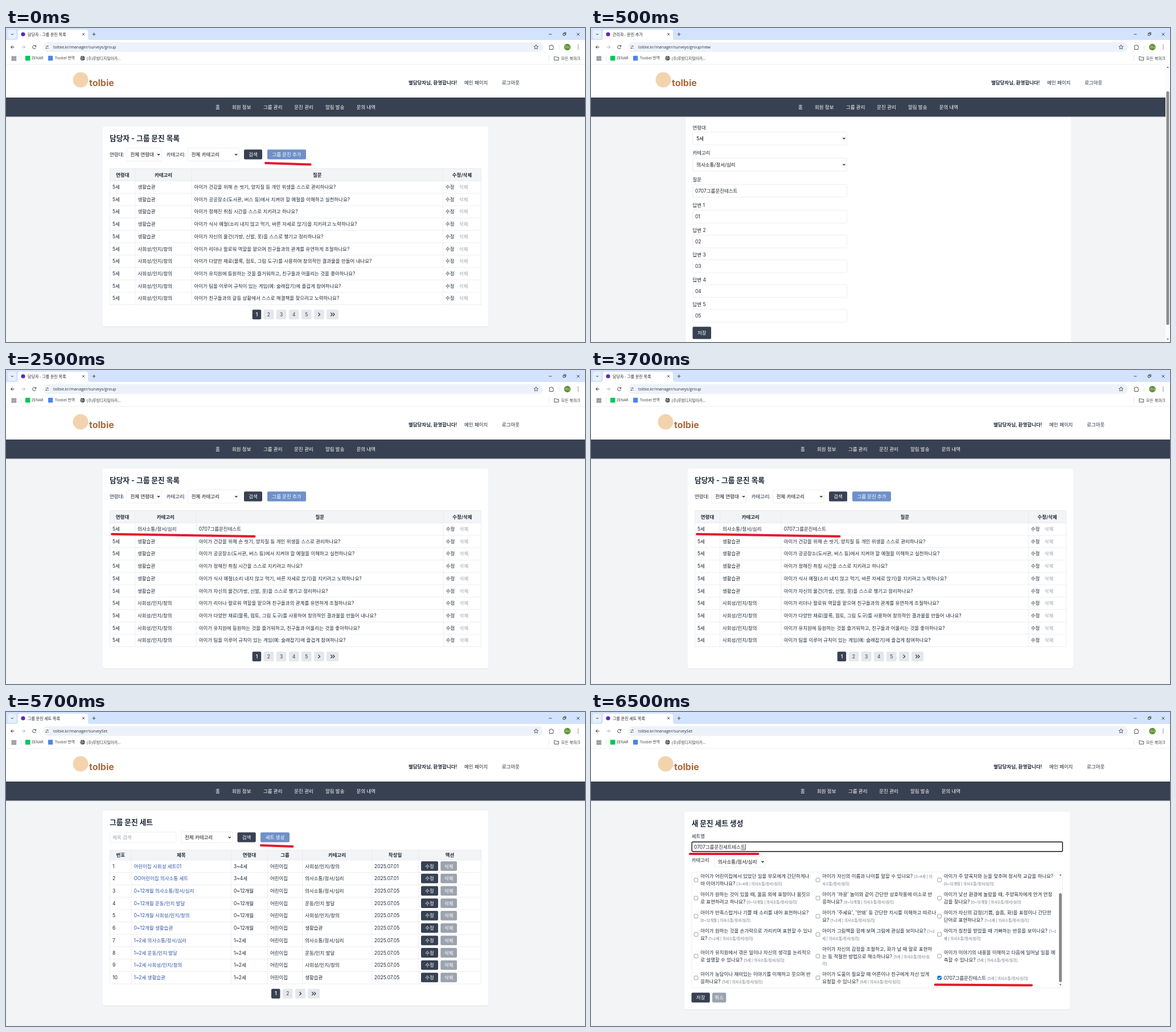
These frames come from a looping animation (1017x551 px, 8 s). An HTML page:

```html
<!DOCTYPE html>
<html lang="ko">
<head>
<meta charset="utf-8">
<style>
html, body { margin: 0; width: 100%; height: 100%; overflow: hidden; background: #f3f4f6; }
svg { display: block; width: 1017px; height: 551px; }
text { font-family: Inter, "Noto Sans CJK KR", "Noto Sans CJK", sans-serif; white-space: pre; }
.ui text { font-family: "Open Sans", "Noto Sans CJK KR", "Noto Sans CJK", sans-serif; }
</style>
</head>
<body>
<svg id="stage" viewBox="0 0 1017 551"></svg>
<script>
const INK = '#1f2937', DARK = '#374151', LINE = '#e5e7eb', PALE = '#f3f4f6',
      GRAY = '#9ca3af', BLUE = '#6f90c8', LINK = '#2f55a8', RED = '#e5182f';
const SIZE = 8.47;

// Drawing helpers; text is placed by its vertical centre.
const text = (x, y, s, { size = SIZE, fill = INK, weight = 400, anchor = 'start' } = {}) =>
  `<text x="${x}" y="${y + size * 0.37}" font-size="${size}" fill="${fill}" font-weight="${weight}" text-anchor="${anchor}">${s}</text>`;
const rect = (x, y, x2, y2, fill, r = 0, extra = '') =>
  `<rect x="${x}" y="${y}" width="${x2 - x}" height="${y2 - y}" rx="${r}" fill="${fill}" ${extra}/>`;
const path = (d, stroke, width = 1, extra = '') =>
  `<path d="${d}" fill="none" stroke="${stroke}" stroke-width="${width}" ${extra}/>`;
const circle = (x, y, r, fill) => `<circle cx="${x}" cy="${y}" r="${r}" fill="${fill}"/>`;
const each = (list, fn) => list.map(fn).join('');

const marker = (x, y, x2, y2) => path(`M${x} ${y}L${x2} ${y2}`, RED, 4, 'stroke-linecap="round"');
const field = (x, y, x2, y2) => rect(x, y, x2, y2, '#fff', 2, `stroke="${LINE}" stroke-width=".7"`);
const select = (x, y, x2, y2, s) => field(x, y, x2, y2) + text(x + 6.5, (y + y2) / 2, s, { fill: '#111' }) +
  path(`M${x2 - 7} ${(y + y2) / 2 - 1}l2 2 2-2`, '#111', 1.2);
const button = (x, y, x2, y2, s, fill = DARK) => rect(x, y, x2, y2, fill, 2) +
  text((x + x2) / 2, (y + y2) / 2, s, { fill: '#fff', weight: 500, anchor: 'middle' });
const card = (x, y, x2, y2) => rect(x, y + 0.8, x2, y2 + 1, '#dfe1e5', 4) + rect(x, y, x2, y2, '#fff', 4);
const title = (x, y, s) => text(x, y, s, { size: 12.7, weight: 700 });
const triangle = (x, y, dir) => `<path d="M${x - 2} ${y + dir}h4l-2 ${-2.4 * dir}z" fill="#6b6b6b"/>`;

function browser(tab, address) {
  const icon = '#3c4043';
  const small = { size: 7, fill: icon };
  return `<g class="ui">` +
    rect(0, 0, 1017, 21, '#d3e3fd') + rect(3, 3, 18, 19, '#e6effd', 4) +
    path('M9 10l2 2 2-2', icon) +
    `<path d="M17 21.500Q21 21 21 17V7Q21 3 25 3H140Q144 3 144 7V17Q144 21 148 21.500z" fill="#fff"/>` +
    circle(30, 11, 3.6, '#5b2bb5') + text(38, 11, tab, { size: 7, fill: '#1f1f1f' }) +
    path('M134 9l4 4m0-4l-4 4M151.500 11h6m-3-3v6', icon, 0.9) +
    path('M953.500 11h5M978.500 9.500h3.500v3.500h-3.500zM980 9v-1h3.500v3.500h-1M1002.500 8.500l5 5m0-5l-5 5', '#222', 0.8) +
    rect(0, 21, 1017, 64, '#fff') + rect(65, 25, 943, 42, '#edf2fa', 8.5) +
    path('M14.500 33.500h-6m3-3l-3 3 3 3', icon) + path('M27.500 33.500h6m-3-3l3 3-3 3', '#b4b7bb') +
    path('M52.300 32a3 3 0 1 0 .2 2.500M52.700 30v2.300h-2.300', icon) +
    circle(72, 33.5, 5.6, '#fff') +
    path('M69 31.700h2.500M73.500 31.700h2M68.700 35.300h2M72.700 35.300h2.700', icon, 0.8) +
    circle(72.8, 31.7, 1, icon) + circle(71.2, 35.3, 1, icon) +
    text(83, 33.2, address, { size: 7.18, fill: '#30343a' }) +
    path('M931 29.500l1.100 2.600 2.800.2-2.100 1.900.6 2.800-2.400-1.500-2.400 1.500.6-2.800-2.100-1.900 2.800-.2z', icon, 0.8) +
    path('M954.500 31h2a1.200 1.200 0 0 1 2.400 0h2.100v2.200a1.200 1.200 0 0 1 0 2.300v2h-6.500v-2a1.200 1.200 0 0 0 0-2.300z', icon, 0.9) +
    path('M971.500 29v9', '#d3e3fd', 0.8) +
    circle(986, 33.5, 5.7, '#5f9134') + text(986, 33.5, '가나', { size: 4.5, fill: '#fff', anchor: 'middle' }) +
    each([30.3, 33.5, 36.7], y => circle(1005, y, 0.8, icon)) +
    each([10.5, 14.8], x => each([50, 54.3], y => rect(x, y, x + 2.7, y + 2.7, 'none', 0, `stroke="${icon}" stroke-width=".8"`))) +
    path('M26.500 48v10M953.500 48v10', '#d3e3fd', 0.8) +
    rect(34, 48.8, 42.5, 57.2, '#03c75a') + text(45, 53, 'ZENAR', { ...small, size: 6.6 }) +
    rect(74, 48.8, 82.3, 57.2, '#4a86e8', 1) + text(86, 53, 'Toobel 번역', { ...small, size: 6.7 }) +
    circle(134.5, 53, 4, '#4b4f54') + path('M131 52q3 2 3.500-2.500M133 56q0-3 4.500-3', '#fff', 0.8) +
    text(142, 53, '(주)루밤디지털아카...', { ...small, size: 6.8 }) +
    path('M963 50.300h2.700l1 1h4v5h-7.700z', icon, 0.9) + text(975, 53, '모든 북마크', small) +
    `</g>` + rect(0, 63.5, 1017, 64.2, '#e3e6ea');
}

function siteHeader(right = 1017) {
  const nav = [[368, '홈'], [397, '회원 정보'], [452, '그룹 관리'], [506.3, '문진 관리'], [561, '알림 발송'], [615.7, '문의 내역']];
  return rect(0, 64.2, right, 122, '#fff') + rect(0, 122, right, 155.7, DARK) + rect(0, 155.7, right, 156.7, '#d5d8dd') +
    `<g transform="translate(${(right - 1017) / 2})">` +
    circle(131, 91, 13.5, '#f3d3ae') + text(146, 96, 'tolbie', { size: 16, fill: '#a9683a', weight: 700 }) +
    text(707, 95.5, '별담당자님, 환영합니다!', { weight: 600 }) +
    text(805, 95.5, '메인 페이지') + text(871, 95.5, '로그아웃') +
    each(nav, ([x, s]) => text(x, 138.5, s, { fill: '#fff', weight: 500 })) + `</g>`;
}

const ROW = 21.72;
function table(cols, top, headHeight, heads, rows, cell) {
  const last = cols.length - 1, first = top + headHeight, bottom = first + ROW * rows.length;
  let lines = `M${cols[0]} ${top}H${cols[last]}`;
  for (let i = 0; i <= rows.length; i++) lines += `M${cols[0]} ${first + ROW * i}H${cols[last]}`;
  for (const x of cols) lines += `M${x} ${top}V${bottom}`;
  return rect(cols[0], top, cols[last], first, PALE) + path(lines, LINE, 0.7) +
    each(heads, (s, i) => text((cols[i] + cols[i + 1]) / 2, top + headHeight / 2, s, { weight: 600, anchor: 'middle' })) +
    each(rows, (row, r) => {
      const y = first + ROW * (r + 0.5) - 0.3;
      return each(row, (s, i) => text(cols[i] + 4.5, y, s, cell(i))) + actions(cols[last - 1], y, row.length);
    });
}
const actions = (x, y, count) => count > 3
  ? button(x + 4.5, y - 8.4, x + 34.5, y + 8.4, '수정') + button(x + 38.8, y - 8.4, x + 67.6, y + 8.4, '삭제', GRAY)
  : text(x + 4.5, y, '수정') + text(x + 28.5, y, '삭제', { fill: GRAY });

function pager(x, y, pages) {
  let out = '';
  for (let p = 1; p <= pages + 2; p++) {
    const w = p === 1 ? 15.5 : p > pages + 1 ? 21 : 17.7, mid = x + w / 2, cy = y + 8.5;
    out += rect(x, y, x + w, y + 17, p === 1 ? DARK : LINE, 2);
    if (p <= pages) out += text(mid, cy, p, { anchor: 'middle', fill: p === 1 ? '#fff' : DARK, weight: p === 1 ? 600 : 400 });
    else out += each(p > pages + 1 ? [-3.4, 0.4] : [-1.4], dx => path(`M${mid + dx} ${cy - 3}l3 3-3 3`, INK, 1.2));
    x += w + 4.4;
  }
  return out;
}

const LIFE = '생활습관', SOCIAL = '사회성/인지/창의', TALK = '의사소통/정서/심리', MOVE = '운동/인지 발달';
const added = '0707그룹문진테스트';
const questions = [
  '아이가 건강을 위해 손 씻기, 양치질 등 개인 위생을 스스로 관리하나요?',
  '아이가 공공장소(도서관, 버스 등)에서 지켜야 할 예절을 이해하고 실천하나요?',
  '아이가 정해진 취침 시간을 스스로 지키려고 하나요?',
  '아이가 식사 예절(소리 내지 않고 먹기, 바른 자세로 앉기)을 지키려고 노력하나요?',
  '아이가 자신의 물건(가방, 신발, 옷)을 스스로 챙기고 정리하나요?',
  '아이가 리더나 팔로워 역할을 맡으며 친구들과의 관계를 유연하게 조절하나요?',
  '아이가 다양한 재료(블록, 점토, 그림 도구)를 사용하여 창의적인 결과물을 만들어 내나요?',
  '아이가 유치원에 등원하는 것을 즐거워하고, 친구들과 어울리는 것을 좋아하나요?',
  '아이가 팀을 이루어 규칙이 있는 게임(예: 술래잡기)에 즐겁게 참여하나요?',
  '아이가 친구들과의 갈등 상황에서 스스로 해결책을 찾으려고 노력하나요?'
].map((q, i) => ['5세', i < 5 ? LIFE : SOCIAL, q]);

const listPage = (cols, rows) =>
  browser('담당자 - 그룹 문진 목록', 'tolbie.kr/manager/surveys/group') + siteHeader() +
  card(169.5, 173, 847, 523.7) + title(182, 193.5, '담당자 - 그룹 문진 목록') +
  text(182, 222, '연령대:') + select(212, 210.5, 273, 233.5, '전체 연령대') +
  text(281.7, 222, '카테고리:') + select(319.3, 210.5, 409.3, 233.5, '전체 카테고리') +
  button(418, 213.3, 450, 230.5, '검색') + button(459, 213.3, 527, 230.5, '그룹 문진 추가', BLUE) +
  table(cols, 246.6, 21.7, ['연령대', '카테고리', '질문', '수정/삭제'], rows, () => ({})) +
  pager(432.7, 494.2, 5);

const firstList = () => listPage([182.5, 227, 326, 767.5, 834.5], questions) + marker(456, 237, 534.7, 239.5);
const updatedList = () => listPage([182.5, 226.5, 334.2, 768.3, 834.5], [['5세', TALK, added], ...questions.slice(0, 9)]) +
  marker(186, 288, 436.5, 292);

function formPage() {
  const input = (y, s) => field(178.7, y, 449.5, y + 22.5) + text(183, y + 11.2, s);
  return browser('관리자 - 문진 추가', 'tolbie.kr/manager/surveys/group/new') +
    rect(165.5, 156, 844, 551, LINE) + rect(166, 156, 843.5, 551, '#fff') + siteHeader(1009) +
    text(178.5, 175.3, '연령대') + select(178.7, 182.3, 449.5, 205, '5세') +
    text(178.5, 219.3, '카테고리') + select(178.7, 228.3, 449.5, 251, TALK) +
    text(178.5, 265.5, '질문') + input(274.3, added) +
    each([1, 2, 3, 4, 5], n => text(178.5, 267.7 + 43.45 * n, `답변 ${n}`) + input(276.4 + 43.45 * n, `0${n}`)) +
    button(178.5, 524.3, 211, 545.7, '저장') +
    rect(1009, 64.2, 1017, 551, '#fcfcfc') + rect(1010.5, 111, 1015.5, 521, '#8b8b8b', 2.5) +
    triangle(1013, 69, 1) + triangle(1013, 546, -1);
}

function setPage() {
  const kinds = [TALK, MOVE, SOCIAL, LIFE];
  const rows = [['1', '어린이집 사회성 세트01', '3~4세', '어린이집', SOCIAL, '2025.07.01'],
                ['2', 'OO어린이집 의사소통 세트', '3~4세', '어린이집', TALK, '2025.07.01']];
  for (let i = 0; i < 8; i++) {
    const age = i < 4 ? '0~12개월' : '1~2세', kind = kinds[i % 4];
    rows.push([i + 3, `${age} ${kind}`, age, '어린이집', kind, '2025.07.05']);
  }
  return browser('그룹 문진 세트 목록', 'tolbie.kr/manager/surveySet') + siteHeader() +
    card(169.5, 173, 847, 515.3) + title(182, 193.5, '그룹 문진 세트') +
    field(182.5, 210.8, 298.7, 228.8) + text(187, 219.7, '제목 검색', { fill: GRAY }) +
    select(307.5, 210.3, 397.8, 229.3, '전체 카테고리') +
    button(406.5, 211.2, 438.7, 228.5, '검색') + button(447, 211.2, 498, 228.5, '세트 생성', BLUE) +
    table([182.5, 220, 395.5, 459.5, 520.7, 642.5, 724.5, 834.5], 242.3, 17.6,
      ['번호', '제목', '연령대', '그룹', '카테고리', '작성일', '액션'], rows, i => ({ fill: i === 1 ? LINK : INK })) +
    pager(466, 485.7, 2) + marker(448, 234, 503.5, 236);
}

// Each entry: [lines], where "[" opens the small grey tag.
const choices = [
  ['아이가 어린이집에서 있었던 일을 부모에게 간단하게나|마 이야기하나요? [3~4세 # TALK]', '아이가 자신의 이름과 나이를 말할 수 있나요? [3~4세 # 의|~사소통/정서/심리]', '아이가 주 양육자와 눈을 맞추며 정서적 교감을 하나요?|[0~12개월 # TALK]'],
  ['아이가 원하는 것이 있을 때, 울음 외에 표정이나 몸짓으|로 표현하려고 하나요? [0~12개월 # TALK]', "아이가 '까꿍' 놀이와 같이 간단한 상호작용에 미소로 반|응하나요? [0~12개월 # TALK]", '아이가 낯선 환경에 놀랐을 때, 주양육자에게 안겨 안정|감을 찾나요? [0~12개월 # TALK]'],
  ['아이가 만족스럽거나 기쁠 때 소리를 내어 표현하나요?|[0~12개월 # TALK]', "아이가 '주세요', '안돼' 등 간단한 지시를 이해하고 따르나|요? [1~2세 # TALK]", '아이가 자신의 감정(기쁨, 슬픔, 화)을 표정이나 간단한|단어로 표현하나요? [1~2세 # TALK]'],
  ['아이가 원하는 것을 손가락으로 가리키며 표현할 수 있나|요? [1~2세 # TALK]', '아이가 그림책을 함께 보며 그림에 관심을 보이나요? [1~2|~세 # TALK]', '아이가 칭찬을 받았을 때 기뻐하는 반응을 보이나요? [1~2|~세 # TALK]'],
  ['아이가 유치원에서 겪은 일이나 자신의 생각을 논리적으|로 설명할 수 있나요? [5세 # TALK]', '아이가 자신의 감정을 조절하고, 화가 날 때 말로 표현하|는 등 적절한 방법으로 해소하나요? [5세 # 의사소통/정서/심|~리]', '아이가 이야기의 내용을 이해하고 다음에 일어날 일을 예|측할 수 있나요? [5세 # TALK]'],
  ['아이가 농담이나 재미있는 이야기를 이해하고 웃으며 반|응하나요? [5세 # TALK]', '아이가 도움이 필요할 때 어른이나 친구에게 자신 있게|요청할 수 있나요? [5세 # TALK]', added + ' [5세 # TALK]']
];
function choice(x, y, s, checked) {
  const lines = s.replace('TALK', TALK).replace('#', '|'.replace('|', '\u0001')).split('|');
  const tag = part => `<tspan font-size="6.35" fill="#6b7280">${part.replace('\u0001', '|')}</tspan>`;
  const box = rect(x - 3.3, y - 3.3, x + 3.3, y + 3.3, checked ? '#0b6bd3' : '#fff', 1.2,
    `stroke="${checked ? '#0b6bd3' : '#767676'}" stroke-width=".7"`);
  return box + (checked ? path(`M${x - 2} ${y}l1.500 1.600 2.700-3.300`, '#fff', 1.1) : '') +
    each(lines, (line, i) => {
      const rich = line[0] === '~' ? tag(line.slice(1)) : line.replace(/\[.*/, tag);
      return text(x + 7.7, y + (i - (lines.length - 1) / 2) * 12.9, rich);
    });
}

function createPage() {
  const rowY = [294.8, 326.6, 358.4, 390.3, 428.4, 466.5], colX = [184.5, 398.5, 612];
  return browser('그룹 문진 세트 목록', 'tolbie.kr/manager/surveySet') + siteHeader() +
    card(163.8, 175, 841.5, 522) + title(176.7, 195, '새 문진 세트 생성') +
    text(176.7, 218.3, '세트명') + rect(177.2, 228, 828.3, 244.7, '#fff', 2, 'stroke="#111" stroke-width="1.4"') +
    text(181, 236.5, '0707그룹문진세트테스트') + path('M271.500 231.500v10M263.500 241.800h7.500', '#111', 0.7) +
    text(176.7, 260, '카테고리') + select(216.5, 253.5, 306.5, 272, TALK) +
    field(177, 281, 828.5, 484) +
    each(choices, (row, r) => each(row, (s, c) => choice(colX[c], rowY[r], s, r === 5 && c === 2))) +
    rect(821, 281.5, 828, 483.5, '#fcfcfc') + rect(822, 318, 827, 474, '#8b8b8b', 2.5) +
    triangle(824.5, 286, 1) + triangle(824.5, 478.5, -1) +
    button(176.5, 492.5, 208.8, 509.7, '저장') + button(213, 492.5, 237.3, 509.7, '취소', GRAY) +
    marker(174, 249, 293.5, 249) + marker(604.5, 478.5, 774, 479.5);
}

const scenes = [[500, firstList], [2500, formPage], [4500, updatedList], [6500, setPage], [8000, createPage]];
const stage = document.getElementById('stage');
let current;
function tick() {
  const time = performance.now() % 8000;
  const scene = scenes.find(([end]) => time < end)[1];
  if (scene !== current) {
    current = scene;
    stage.innerHTML = rect(0, 0, 1017, 551, PALE) + scene();
  }
  requestAnimationFrame(tick);
}
tick();
</script>
</body>
</html>
```
